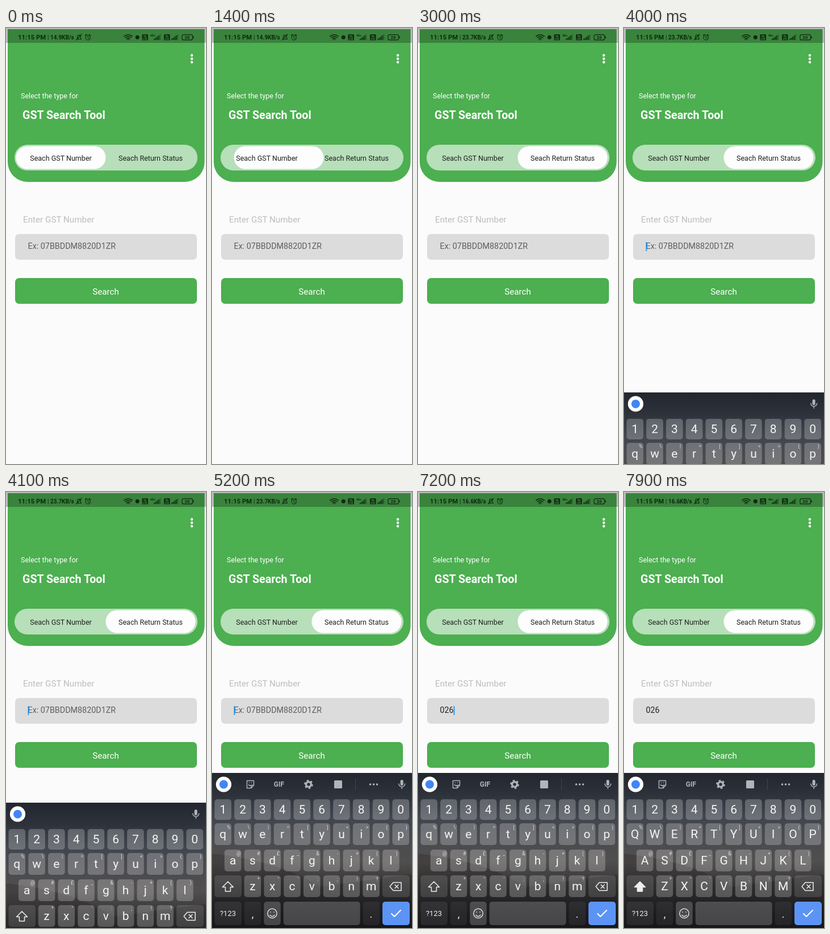
An HTML page for the animation above (8 s loop, 352 px wide and 762 px high).

```html
<!DOCTYPE html>
<html lang="en">
<head>
<meta charset="utf-8">
<title>GST Search Tool</title>
<style>
html, body { margin: 0; width: 100%; height: 100%; overflow: hidden; background: #fbfbfb; }
svg { display: block; width: 100%; height: 100%; font-family: Roboto, sans-serif; }
.mid { text-anchor: middle; }
.line { fill: none; stroke-width: 1.5; stroke-linecap: round; stroke-linejoin: round; }
</style>
</head>
<body>
<svg id="stage" viewBox="0 0 352 762"></svg>
<script>
const rect = (x, y, w, h, r, fill, more = '') =>
  `<rect x="${x}" y="${y}" width="${w}" height="${h}" rx="${r}" fill="${fill}" ${more}/>`;
const text = (x, y, size, fill, str, more = '') =>
  `<text x="${x}" y="${y}" font-size="${size}" fill="${fill}" ${more}>${str.replace(/&/g, '&amp;').replace(/</g, '&lt;')}</text>`;
const dot = (x, y, r, fill) => `<circle cx="${x}" cy="${y}" r="${r}" fill="${fill}"/>`;
const line = (d, stroke, more = '') => `<path class="line" d="${d}" stroke="${stroke}" ${more}/>`;
const mid = 'class="mid"', bold = 'font-weight="700"';
const green = '#4caf50', ink = '#10280f', grey = '#b1b4b9';

function bars(x) {
  return [2.5, 4, 6, 8, 10].map((h, i) => rect(x + i * 2.6, 21 - h, 1.7, h, .4, ink, i > 3 ? 'opacity=".45"' : '')).join('');
}

function volte(x) {
  return rect(x, 11, 10.5, 10.5, 1.5, ink) +
    text(x + 5.2, 16, 5, '#4a934c', 'Vo', `class="mid" ${bold}`) +
    text(x + 5.2, 20.6, 4.5, '#4a934c', 'LTE', `class="mid" ${bold}`);
}

function statusBar() {
  return rect(0, 0, 352, 26, 0, '#000', 'opacity=".25"') +
    text(21, 20, 11.3, ink, '11:15 PM', bold) + text(73, 20, 10, ink, '|') +
    text(78, 20, 10, ink, '', `${bold} id="speed"`) +
    line('M124.5 19.5h8l-1.2-1.7v-2.6a2.8 2.8 0 0 0-5.6 0v2.6zM123.5 21l9.5-10', ink, 'style="stroke-width:1.1"') +
    line('M140 16.7a4.2 4.2 0 1 0 8.4 0a4.2 4.2 0 1 0-8.4 0M144.2 14.3v2.6l1.6 1M139.4 13l2.4-2M149 13l-2.4-2', ink, 'style="stroke-width:1.1"') +
    line('M207.8 14.6a10.5 10.5 0 0 1 14.4 0M210.2 17a7 7 0 0 1 9.6 0M212.6 19.2a3.5 3.5 0 0 1 4.8 0', ink) +
    dot(215, 20.6, 1, ink) + dot(231.3, 16.2, 3.5, ink) +
    volte(239.5) + text(254, 14.5, 5, ink, '4G+', bold) + bars(260) +
    volte(278) + bars(291) +
    rect(309.8, 11.6, 18.6, 9.3, 3, 'none', `stroke="${ink}" stroke-width="1.2"`) +
    rect(329.3, 14.3, 1.4, 4, .7, ink) +
    text(319, 19.1, 7.8, ink, '26', `class="mid" ${bold}`);
}

function page() {
  return `<path d="M3 2H349.5V234a35 35 0 0 1-35 35H38a35 35 0 0 1-35-35z" fill="${green}"/>` +
    statusBar() +
    [47.8, 53.8, 59.8].map(y => dot(327, y, 2.2, '#fff')).join('') +
    text(26, 123, 12.54, '#fff', 'Select the type for') +
    text(29, 158.5, 19.7, '#fff', 'GST Search Tool', bold) +
    rect(15, 204, 322, 45, 22.5, '#b7dfb9') +
    rect(17.5, 206.5, 158, 40, 20, '#fdfdfd', 'id="pill"') +
    text(96.5, 231.5, 12.54, '#212121', 'Seach GST Number', mid) +
    text(254.5, 231.5, 12.54, '#212121', 'Seach Return Status', mid) +
    text(30, 340.3, 15.23, '#bdbdbd', 'Enter GST Number') +
    rect(16, 360, 320, 45, 7, '#dcdcdc') +
    text(38.5, 386.3, 14.33, '#5f5f5f', '', 'id="entry"') +
    rect(38.5, 374, 1.8, 16, .9, '#2196f3', 'id="caret"') +
    rect(16, 437, 320, 45, 7, green) +
    text(175.5, 466, 15.23, '#fff', 'Search', mid);
}

const rows = [
  { keys: '1234567890', signs: '', x: 19.3, y: 537, h: 36 },
  { keys: 'qwertyuiop', signs: '%\\|=[]<>{}', x: 19.3, y: 579, h: 38 },
  { keys: 'asdfghjkl', signs: '@#£_&-+()', x: 36.7, y: 625, h: 38 },
  { keys: 'zxcvbnm', signs: '*"\':;!?', x: 71.5, y: 670, h: 38 }
];
const key = (x, y, w, h, alpha) => rect(x, y, w, h, 5, '#fff', `fill-opacity="${alpha}"`);

function letterRow({ keys, signs, x, y, h }) {
  return [...keys].map((c, i) => {
    const cx = x + i * 34.77;
    return key(cx - 14.8, y, 29.6, h, .23) +
      text(cx, y + h / 2 + 7, 21, '#f4f4f4', c, 'class="mid letter"') +
      (signs ? text(cx + 10.3, y + 9.5, 8.8, '#dcdcdc', signs[i], mid) : '');
  }).join('');
}

function tools() {
  return line('M61.5 504.5h12v8l-4.5 5h-7.5zM73.5 512.5h-4.5v5M64.5 511.5q2 3 4 1M65.5 508v.3M69.5 508v.3', grey) +
    text(118, 515.3, 12, grey, 'GIF', `class="mid" ${bold}`) +
    `<g fill="none" stroke="${grey}"><circle cx="170" cy="511" r="4.4" stroke-width="3.4"/>` +
    '<circle cx="170" cy="511" r="6.8" stroke-width="2.2" stroke-dasharray="3.56"/></g>' +
    rect(215, 504, 14, 14, 1.5, grey) +
    rect(252, 501, 1, 20, 0, '#fff', 'opacity=".12"') +
    [278.5, 284.5, 290.5].map(x => dot(x, 511, 1.8, grey)).join('');
}

function keyboard() {
  const tones = ['#22262f', '#2d323b', '#41454d', '#4a4b4f', '#514f4e', '#373637', '#232428', '#17181c'];
  const stops = tones.map((c, i) => `<stop offset="${i / 7}" stop-color="${c}"/>`).join('');
  return `<linearGradient id="dusk" x2="0" y2="1">${stops}</linearGradient>` +
    rect(0, 491, 352, 271, 0, 'url(#dusk)') +
    '<path d="M0 632Q120 645 190 690L352 668V762H0z" fill="#120f0e" opacity=".22"/>' +
    dot(20.5, 511, 13.6, '#fff') + dot(20.5, 511, 7.5, '#4285f4') +
    rect(331.6, 503, 5, 10, 2.5, grey) + line('M328.8 510a5.4 5.4 0 0 0 10.8 0M334.2 515.6v3', grey) +
    `<g id="tools">${tools()}</g>` +
    rows.map(letterRow).join('') +
    key(4.5, 670, 47.5, 38, .13) + key(300, 670, 48, 38, .13) +
    line('M28 681l9.5 9.5h-5v7.5h-9v-7.5h-5z', '#eee', 'id="shift"') +
    line('M319 682.5h14v14h-14l-6-7zM322 686.5l6 6M328 686.5l-6 6', '#eee') +
    key(4.5, 716, 47.5, 41, .08) + key(56.7, 716, 29.6, 41, .06) +
    key(91.2, 716, 29.6, 41, .2) + key(125.7, 716, 135, 41, .2) + key(265.5, 716, 29.6, 41, .06) +
    text(28, 741.3, 13, '#eee', '?123', mid) +
    text(71.5, 744, 19, '#eee', ',', mid) + text(280, 744, 19, '#eee', '.', mid) +
    line('M97.8 736.5a8.2 8.2 0 1 0 16.4 0a8.2 8.2 0 1 0-16.4 0M102 739.5q4 4.5 8 0M103 734v.4M109 734v.4', '#ddd') +
    rect(300, 716, 48, 41, 5, '#5c94f6') +
    line('M316 737l5 5l11-11', '#fff', 'style="stroke-width:2"');
}

const stage = document.getElementById('stage');
stage.innerHTML = page() + `<g id="board">${keyboard()}</g>`;
const el = id => document.getElementById(id);
const [pill, speed, entry, caret, board, toolbar, shift] =
  ['pill', 'speed', 'entry', 'caret', 'board', 'tools', 'shift'].map(el);
const letters = [...document.querySelectorAll('.letter')];
const lower = letters.map(n => n.textContent);

const clamp = v => Math.min(1, Math.max(0, v));
const easeOut = (t, start, length, power) => 1 - (1 - clamp((t - start) / length)) ** power;
const swap = t => easeOut(t, 750, 250, 2.2) - easeOut(t, 1250, 250, 2.2) + easeOut(t, 1950, 250, 2.2);
const strokes = [[5800, '0'], [6500, '2'], [7200, '6']];
const hint = 'Ex: 07BBDDM8820D1ZR';

function draw(t) {
  const done = strokes.filter(([at]) => t >= at);
  const typed = done.map(s => s[1]).join('');
  const caps = t >= 7700;

  pill.setAttribute('x', 17.5 + 158 * swap(t));
  speed.textContent = t < 1800 ? '14.9KB/s' : t < 5800 ? '23.7KB/s' : '16.6KB/s';
  entry.textContent = typed || hint;
  entry.setAttribute('fill', typed ? '#212121' : '#5f5f5f');

  // The caret restarts its blink with each keystroke
  const since = t - (done.length ? done[done.length - 1][0] : 3750);
  caret.setAttribute('x', 38.5 + typed.length * 8.05);
  caret.setAttribute('opacity', since >= 0 && since % 1000 < 500 ? 1 : 0);

  board.setAttribute('transform', `translate(0 ${271 * (1 - easeOut(t, 3910, 338, 2))})`);
  toolbar.setAttribute('opacity', clamp((t - 4300) / 200));
  letters.forEach((n, i) => n.textContent = caps ? lower[i].toUpperCase() : lower[i]);
  shift.style.fill = caps ? '#eee' : 'none';
}

// The screen refreshes ten times a second
function tick() {
  draw(Math.floor((performance.now() + 8) / 100) * 100 % 8000);
  requestAnimationFrame(tick);
}
tick();
</script>
</body>
</html>
```
